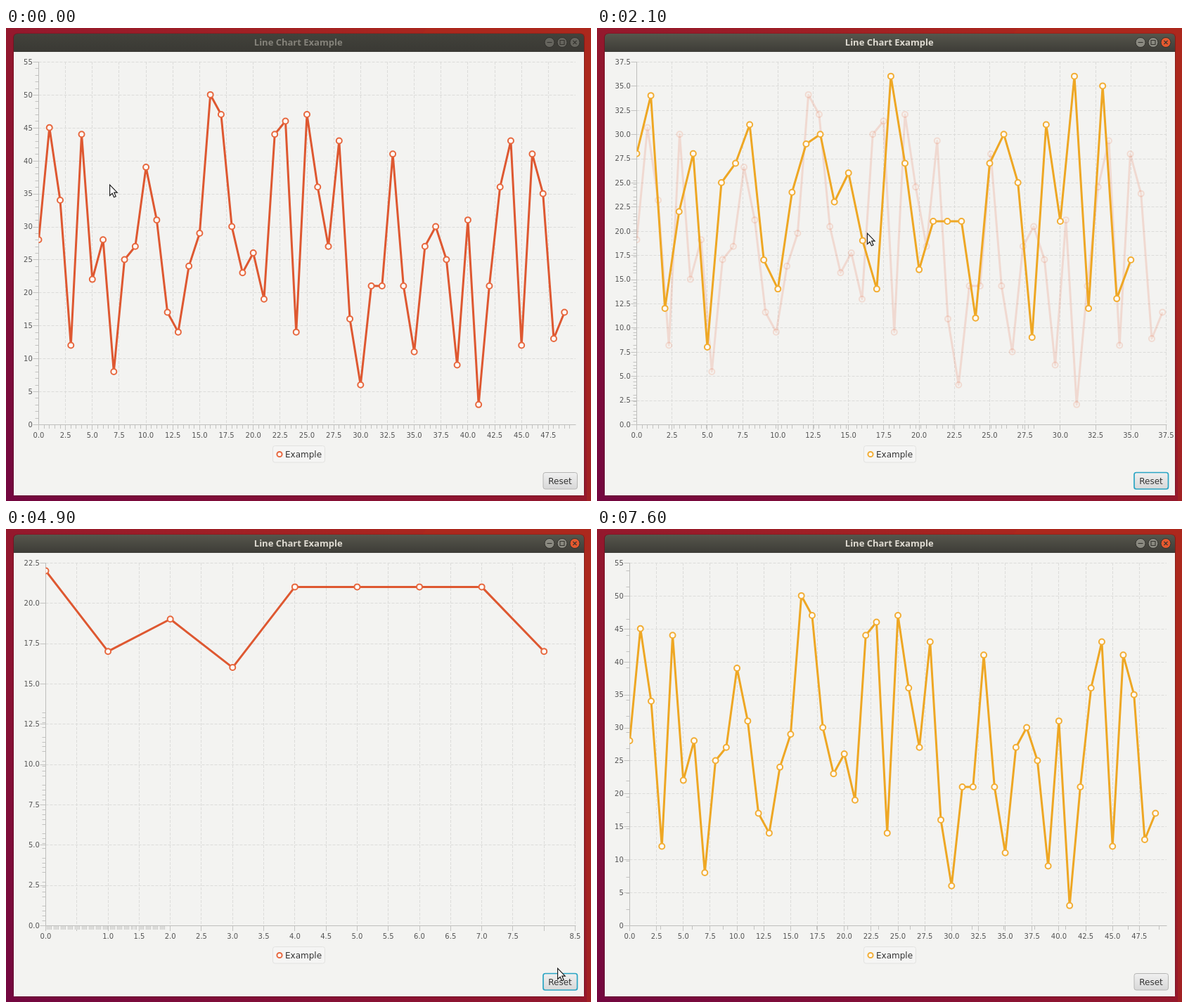
Animation, 832 px wide and 673 px high, one loop 7.7 s. Source, as an HTML page:

```html
<!DOCTYPE html>
<html>
<head>
<meta charset="utf-8">
<style>
html, body { margin: 0; width: 832px; height: 673px; overflow: hidden; }
svg { display: block; font-family: "DejaVu Sans", sans-serif; }
.tick { font-size: 10px; fill: #555; }
.line { fill: none; stroke-width: 3; stroke-linejoin: round; }
.dots { fill: #fefbf8; stroke-width: 2; }
</style>
</head>
<body>
<svg width="832" height="673" viewBox="0 0 832 673">
  <defs>
    <linearGradient id="desk" gradientUnits="userSpaceOnUse" x1="0" y1="673" x2="560" y2="0">
      <stop offset="0" stop-color="#730740"/>
      <stop offset=".5" stop-color="#8f1530"/>
      <stop offset="1" stop-color="#a9261f"/>
    </linearGradient>
    <linearGradient id="bar" x2="0" y2="1">
      <stop offset="0" stop-color="#56564c"/><stop offset="1" stop-color="#3d3c37"/>
    </linearGradient>
    <linearGradient id="barOff" x2="0" y2="1">
      <stop offset="0" stop-color="#42423b"/><stop offset="1" stop-color="#3a3934"/>
    </linearGradient>
    <linearGradient id="face" x2="0" y2="1">
      <stop offset="0" stop-color="#f0f0f0"/><stop offset="1" stop-color="#d8d8d8"/>
    </linearGradient>
    <linearGradient id="faceHover" x2="0" y2="1">
      <stop offset="0" stop-color="#f8f8f8"/><stop offset="1" stop-color="#e4e4e4"/>
    </linearGradient>
    <clipPath id="plot"><rect id="plotBox" y="48" height="517"/></clipPath>
  </defs>
  <rect width="832" height="673" fill="url(#desk)"/>
  <path d="M598 0H832V673H826L823 8H592Z" fill="#b02c1c" opacity=".45"/>
  <rect x="10" y="7.5" width="813" height="658.5" rx="6" fill="#300" opacity=".3"/>
  <path d="M11 34H822V665H11Z" fill="#f3f3f1"/>
  <g id="title"></g>
  <g id="axes"></g>
  <g id="series" clip-path="url(#plot)"></g>
  <g id="front"></g>
</svg>
<script>
const LOOP = 7700, RIGHT = 809.5, TOP = 48.5, BASE = 564.5;
const RED = { line: '#de5831', dot: '#e7683f' };
const AMBER = { line: '#eea724', dot: '#f2ae35' };
const $ = id => document.getElementById(id);
const clamp = v => Math.max(0, Math.min(1, v));
const mix = (a, b, f) => a + (b - a) * f;
const snap = v => Math.round(v - .5) + .5;

// the charted values; the later charts are filters of these
const all = [28, 45, 34, 12, 44, 22, 28, 8, 25, 27, 39, 31, 17, 14, 24, 29, 50, 47, 30, 23,
  26, 19, 44, 46, 14, 47, 36, 27, 43, 16, 6, 21, 21, 41, 21, 11, 27, 30, 25, 9,
  31, 3, 21, 36, 43, 12, 41, 35, 13, 17];
const mid = all.filter(v => v > 6 && v < 38);
const few = mid.filter(v => v >= 16 && v <= 22);

function view(at, data, color, left, x, y, hide = []) {
  return { at, data, color, left, x, y, hide,
    sx: (RIGHT - left) / x.up, sy: (BASE - TOP) / y.up };
}
const axis = (up, step, dec = 1, end = up) => ({ up, step, dec, end });
const full = (at, color) => view(at, all, color, 46.5, axis(50, 2.5, 1, 47.5), axis(55, 5, 0));
const views = [
  full(-9999, RED),
  view(1353, mid, AMBER, 56.5, axis(37.5, 2.5), axis(37.5, 2.5)),
  view(3256, few, RED, 56.5, axis(8.5, .5), axis(22.5, 2.5), [.5, 8]),
  full(5470, AMBER)
];
const AXIS_LAG = 7;

// pointer moves: start, end, then where it comes to rest
const moves = [[400, 900, 517, 288], [1000, 1200, 624, 292], [1400, 2120, 378, 292],
  [2400, 2800, 433, 299], [2900, 3100, 502, 317], [3600, 3900, 826, 660],
  [3900, 4700, 785, 625], [4900, 5200, 787, 647], [6600, 6900, 298, 82], [6900, 7000, 18, 3]];

function pointerAt(t) {
  let p = { x: 148, y: 223 };
  for (const [start, end, x, y] of moves) {
    const f = clamp((t - start) / (end - start));
    p = { x: mix(p.x, x, f), y: mix(p.y, y, f) };
  }
  return p;
}

// the selection runs a little ahead of the pointer
const LEAD = 25;
const bands = [
  { from: 400, until: 1400, x: 148, stop: 624 },
  { from: 2400, until: 3300, x: 378, stop: 502 }
];

function ticks(ax) {
  const n = Math.round(ax.end / ax.step);
  return Array.from({ length: n + 1 }, (_, i) => i * ax.step);
}

// positions between the major ticks, five parts to a step
function minors(ax, scale, len) {
  const out = [];
  for (let i = 1; i * ax.step / 5 < ax.up; i++) {
    const p = i * ax.step / 5 * scale;
    if (i % 5 && p <= len) out.push(p);
  }
  return out;
}

function labels(v, left, sx, sy, opacity) {
  let out = '';
  for (const n of ticks(v.x)) {
    const x = left + n * sx;
    if (x < RIGHT + 1 && !v.hide.includes(n))
      out += `<text x="${x}" y="583.4" text-anchor="middle">${n.toFixed(v.x.dec)}</text>`;
  }
  for (const n of ticks(v.y)) {
    const y = BASE - n * sy;
    if (y > TOP - 1)
      out += `<text x="${left - 8.7}" y="${y + 3.3}" text-anchor="end">${n.toFixed(v.y.dec)}</text>`;
  }
  return `<g class="tick" opacity="${opacity}">${out}</g>`;
}

function drawAxes(v, old, el, sx, sy) {
  let grid = '', marks = '';
  for (const n of ticks(v.x)) {
    const x = snap(v.left + n * sx);
    if (x > RIGHT + 1) continue;
    if (n) grid += `M${x} 48V564`;
    marks += `M${x} 565v7`;
  }
  for (const n of ticks(v.y)) {
    const y = snap(BASE - n * sy);
    if (y < TOP - 1) continue;
    if (n) grid += `M${v.left} ${y}H810`;
    marks += `M${v.left} ${y}h-8`;
  }
  // minor marks keep the scale from before the change
  const from = old || v;
  for (const p of minors(v.x, from.sx, RIGHT - v.left)) marks += `M${snap(v.left + p)} 565v5`;
  for (const p of minors(v.y, from.sy, BASE - TOP)) marks += `M${v.left} ${snap(BASE - p)}h-5`;
  let out = `<path d="${grid}" stroke="#dcdcda" stroke-dasharray="4 2" fill="none"/>` +
    `<path d="${marks}" stroke="#c3c3c1" fill="none"/>` +
    `<path d="M${v.left} 48V${BASE}H810.5" stroke="#bebebc" fill="none"/>`;
  if (old && el < 250) out += labels(old, v.left, sx, sy, 1 - el / 250);
  return out + labels(v, v.left, sx, sy, clamp(el / 750));
}

function drawSeries(v, left, sx, sy, opacity) {
  const pts = v.data.map((n, i) => [left + i * sx, BASE - .5 - n * sy].map(c => c.toFixed(2)));
  const dots = pts.map(([x, y]) => `M${x - 4} ${y}a4 4 0 1 1 8 0a4 4 0 1 1 -8 0`).join('');
  return `<path class="line" d="M${pts.join('L')}" stroke="${v.color.line}" opacity="${opacity}"/>` +
    `<path class="dots" d="${dots}" stroke="${v.color.dot}" opacity="${opacity}"/>`;
}

function drawTitle(on) {
  const grey = on ? '#8b8a81' : '#66655e';
  const disc = (x, fill, glyph) =>
    `<circle cx="${x}" cy="20.5" r="7" fill="${fill}" stroke="#32312d"/>` +
    `<path d="${glyph}" transform="translate(${x} 20.5)" fill="none" stroke="#35342f" stroke-width="1.1"/>`;
  return `<path d="M11 34V14Q11 8 17 8H816Q822 8 822 14V34Z" fill="url(#${on ? 'bar' : 'barOff'})"/>` +
    `<text x="415.7" y="25" text-anchor="middle" font-family="'Noto Sans', sans-serif" font-weight="700"` +
    ` font-size="13" fill="${on ? '#dfdbd2' : '#85837b'}">Line Chart Example</text>` +
    disc(773, grey, 'M-3.5 0H3.5') + disc(791, grey, 'M-3 -3H3V3H-3Z') +
    disc(809, on ? '#e5592f' : grey, 'M-2.5 -2.5L2.5 2.5M2.5 -2.5L-2.5 2.5');
}

function drawFront(t, v, focus) {
  const { x, y } = pointerAt(t);
  const hover = x > 764 && x < 813 && y > 632 && y < 657;
  const shown = t < 7000 || (t >= 7400 && t < 7600);
  let out = '<rect x="379.5" y="594.5" width="74" height="23.5" rx="3" fill="#f5f5f4" stroke="#e2e2e0"/>' +
    `<circle cx="389" cy="606.5" r="3.6" fill="#fefbf8" stroke="${v.color.dot}" stroke-width="2"/>` +
    '<text x="397" y="611" font-size="12" fill="#333">Example</text>' +
    `<rect x="764" y="632.5" width="48.5" height="23.5" rx="3" fill="url(#${hover ? 'faceHover' : 'face'})"` +
    ` stroke="${focus ? '#2aa5c4' : '#b5b5b4'}" stroke-width="${focus ? 1.7 : 1}"/>` +
    '<text x="788" y="649" font-size="12" text-anchor="middle" fill="#333">Reset</text>';
  if (shown)
    out += `<path d="M0 0V15.2L3.6 12L6 17.6L8.6 16.5L6.2 11H10.6Z" transform="translate(${x - .4} ${y + .2})"` +
      ' fill="#fff" stroke="#1c1c1c" stroke-width="1.2"/>';
  return out;
}

function draw(t) {
  const i = views.filter(v => v.at <= t).length - 1;
  const v = views[i], old = views[i - 1], el = t - v.at;
  const f = clamp((el - AXIS_LAG) / 700);
  const sx = old ? mix(old.sx, v.sx, f) : v.sx;
  const sy = old ? mix(old.sy, v.sy, f) : v.sy;

  $('plotBox').setAttribute('x', v.left);
  $('plotBox').setAttribute('width', 810.5 - v.left);
  $('title').innerHTML = drawTitle(t >= 400);
  $('axes').innerHTML = drawAxes(v, old, el, sx, sy);

  let out = '';
  const band = bands.find(b => t >= b.from && t < b.until);
  if (band) {
    const right = Math.min(pointerAt(t).x + LEAD, band.stop);
    out += `<rect x="${band.x}" y="48" width="${right - band.x}" height="516"` +
      ' fill="rgb(16,4,238)" opacity=".53"/>';
  }
  if (old && el < 900) out += drawSeries(old, v.left, old.sx, old.sy, 1 - el / 900);
  out += drawSeries(v, v.left, sx, sy * clamp(el / 500), clamp(el / 200));
  $('series').innerHTML = out;
  $('front').innerHTML = drawFront(t, v, t >= 400 && t < 7600);
}

let last = -1;
function tick() {
  const t = Math.floor(performance.now() % LOOP / 100) * 100;
  if (t !== last) draw(last = t);
  requestAnimationFrame(tick);
}
tick();
</script>
</body>
</html>
```
